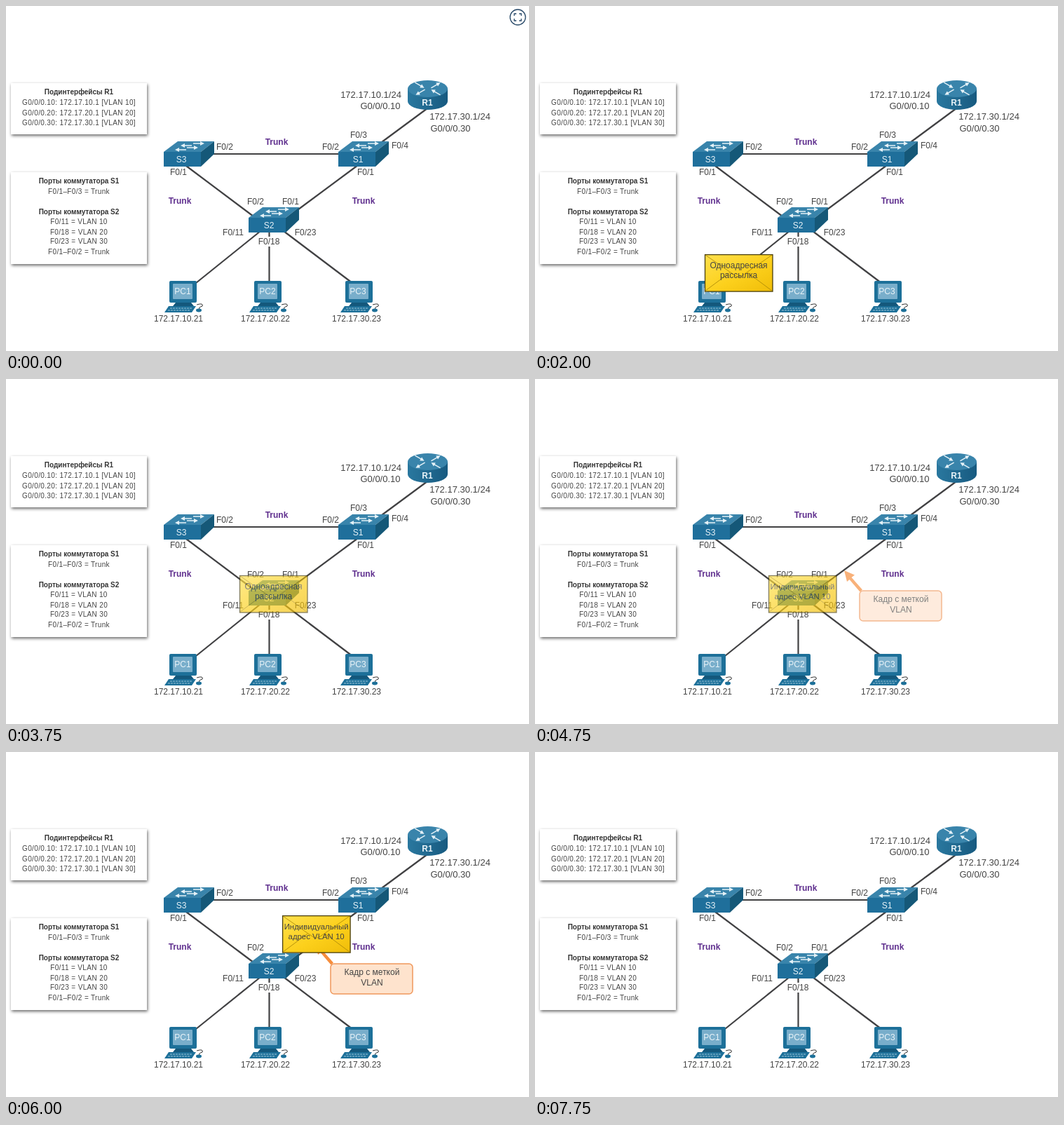
Recreate the animation shown at these times as an HTML page. Size 746 by 492 pixels, loop 8000 ms.

```html
<!DOCTYPE html>
<html lang="ru">
<head>
<meta charset="utf-8">
<style>
html, body { margin: 0; width: 100%; height: 100%; overflow: hidden; background: #fff; }
svg { display: block; font: 12px "Liberation Sans", Arial, sans-serif; fill: #444; }
text { text-anchor: middle; }
.left text { text-anchor: start; }
.links { stroke: #414143; stroke-width: 2.2; }
.trunk { font-weight: bold; fill: #5f2f8e; }
.name { fill: #e8f3f8; }
.panel rect { fill: #fff; filter: drop-shadow(1px 2px 2px #0009); }
.panel text { font-size: 10px; letter-spacing: .35px; }
.panel .title { font-weight: bold; letter-spacing: 0; fill: #333; }
.big { font-size: 13px; }
</style>
</head>
<body>
<svg width="746" height="492" viewBox="0 0 746 492">
  <defs>
    <linearGradient id="gold" x2="1" y2="1">
      <stop stop-color="#ffe04c"/><stop offset=".55" stop-color="#fcd01c"/><stop offset="1" stop-color="#f0bd08"/>
    </linearGradient>
    <linearGradient id="side"><stop stop-color="#2a789f"/><stop offset="1" stop-color="#175a80"/></linearGradient>
    <path id="arrow" d="M-8-.8H2V-3L8 0 2 3V.8H-8z"/>
    <g id="switch">
      <path fill="#3984ab" d="M0 15 20 0H72L53 15z"/>
      <path fill="#1f6f9b" d="M0 15H53V36H0z"/>
      <path fill="#155878" d="M53 15 72 0V18L53 36z"/>
      <g fill="#e4f1f7">
        <use href="#arrow" x="50" y="3"/><use href="#arrow" x="41" y="9"/>
        <use href="#arrow" transform="translate(32 6) scale(-1 1)"/>
        <use href="#arrow" transform="translate(24 12) scale(-1 1)"/>
      </g>
    </g>
    <g id="pc">
      <path fill="#14587c" d="M40 1 46 5V28L40 31z"/>
      <rect x="7" width="39" height="31" rx="2" fill="#1d7099"/>
      <rect x="12" y="4" width="28" height="22" rx="1" fill="#79aecb"/>
      <path fill="#14587c" d="M16 31H38L42 36H12z"/>
      <path fill="#1d7099" d="M6 36H45L39 45H0z"/>
      <path stroke="#9cc6da" stroke-dasharray="3 1" d="M8 39H40M5 42H37"/>
      <path fill="none" stroke="#333" d="M46 34q10-3 8 2-6 2-4 4"/>
      <ellipse cx="49" cy="42" rx="4" ry="2.4" fill="#1d7099"/>
    </g>
  </defs>

  <g id="fullscreen" fill="none" stroke="#294a69" stroke-width="1.3">
    <circle cx="730" cy="16" r="11"/>
    <path d="M725 14v-3h3M732 11h3v3M735 18v3h-3M728 21h-3v-3"/>
  </g>

  <path class="links" d="M296 211H476M257 228 353 300M502 227 413 293M532 197 601 146M363 321 271 395M375.500 322V329M375.500 343V393M396 321 494 395"/>
  <use href="#switch" x="225" y="193"/>
  <use href="#switch" x="474" y="193"/>
  <use href="#switch" x="346" y="287"/>

  <path fill="url(#side)" d="M573 118V136A28.500 12 0 0 0 630 136V118z"/>
  <ellipse cx="601.500" cy="118" rx="28.500" ry="12" fill="#3984ab"/>
  <g id="routerArrows" fill="#e4f1f7"></g>

  <use href="#pc" x="226" y="392"/>
  <use href="#pc" x="347" y="392"/>
  <use href="#pc" x="477" y="392"/>
  <g id="labels"></g>
  <g id="panels" class="panel"></g>

  <g id="callout">
    <path fill="#f68d3c" d="M441 273 456 279.500 451.500 283 467 300.500 463.500 303.500 448.500 286 445 289z"/>
    <rect x="463" y="302" width="117" height="43" rx="5" fill="#fee3cd" stroke="#f0985c" stroke-width="1.5"/>
    <text x="522" y="318">Кадр с меткой</text>
    <text x="522" y="333">VLAN</text>
  </g>
  <g id="packets"></g>
</svg>
<script>
const LOOP = 8000, STEP = 250, FADE = 390;
const byId = id => document.getElementById(id);
const text = (x, y, s, attrs = '') => `<text x="${x}" y="${y}" ${attrs}>${s}</text>`;

byId('routerArrows').innerHTML = [[590, 113, 30], [613, 113, -30], [591, 123, 150], [613, 123, 210]]
  .map(([x, y, a]) => `<use href="#arrow" transform="translate(${x} ${y}) rotate(${a}) scale(.95)"/>`).join('');

const ports = [
  [312, 205, 'F0/2'], [246, 241, 'F0/1'], [463, 205, 'F0/2'], [503, 188, 'F0/3'],
  [562, 203, 'F0/4'], [513, 241, 'F0/1'], [356, 283, 'F0/2'], [406, 283, 'F0/1'],
  [324, 327, 'F0/11'], [375, 340, 'F0/18'], [427, 327, 'F0/23'],
  [246, 450, '172.17.10.21'], [370, 450, '172.17.20.22'], [500, 450, '172.17.30.23']
];
const addresses = [
  [520.5, 131, '172.17.10.1/24'], [534, 147, 'G0/0/0.10'],
  [647.5, 162, '172.17.30.1/24'], [634, 179, 'G0/0/0.30']
];
const names = [[250, 223, 'S3'], [502, 223, 'S1'], [375, 317, 'S2'], [252, 411, 'PC1'], [373, 411, 'PC2'], [502, 411, 'PC3']];
const trunks = [[386, 198], [248, 282], [510, 282]];
byId('labels').innerHTML = [
  ...ports.map(p => text(...p)),
  ...addresses.map(p => text(...p, 'class="big"')),
  ...names.map(p => text(...p, 'class="name"')),
  text(601, 142, 'R1', 'class="name" font-weight="bold"'),
  ...trunks.map(p => text(...p, 'Trunk', 'class="trunk"'))
].join('');

const panel = (y, height, lines) => `<rect x="7" y="${y}" width="194" height="${height}"/>` +
  lines.map(([ty, s, title]) => text(104, ty, s, title ? 'class="title"' : '')).join('');
byId('panels').innerHTML =
  panel(110, 73, [
    [126, 'Подинтерфейсы R1', true],
    [141, 'G0/0/0.10: 172.17.10.1 [VLAN 10]'],
    [156, 'G0/0/0.20: 172.17.20.1 [VLAN 20]'],
    [169.5, 'G0/0/0.30: 172.17.30.1 [VLAN 30]']
  ]) +
  panel(237, 131, [
    [253, 'Порты коммутатора S1', true], [268, 'F0/1–F0/3 = Trunk'],
    [296.5, 'Порты коммутатора S2', true], [311, 'F0/11 = VLAN 10'],
    [326, 'F0/18 = VLAN 20'], [339, 'F0/23 = VLAN 30'], [354, 'F0/1–F0/2 = Trunk']
  ]);

const packets = [
  { lines: ['Одноадресная', 'рассылка'], size: 12, from: [193, 394], to: [333, 280], start: 1125, end: 3625 },
  { lines: ['Индивидуальный', 'адрес VLAN 10'], size: 11.4, from: [333, 280], to: [462, 181], start: 4875, end: 7250 }
];
byId('packets').innerHTML = packets.map(({ lines, size }) => `<g font-size="${size}">
  <rect x=".5" y=".5" width="96.500" height="52.500" fill="url(#gold)" stroke="#4a4012" stroke-width="1.3"/>
  <path d="M1 1 43 30Q48.500 34 54 30L96 1M1 52 36 26M96 52 61 26" fill="none" stroke="#b08d08" stroke-width=".9"/>
  ${text(48.5, 20, lines[0])}${text(48.5, 33.5, lines[1])}</g>`).join('');
packets.forEach((p, i) => p.node = byId('packets').children[i]);

const clamp = v => Math.max(0, Math.min(1, v));
const opacity = (t, { start, end }) => clamp(Math.min((t - start) / FADE + 1, 1 - (t - end) / FADE));

function draw(now) {
  const t = Math.floor(now % LOOP / STEP) * STEP;
  byId('fullscreen').setAttribute('opacity', t < STEP ? 1 : 0);
  byId('callout').setAttribute('opacity', opacity(t, packets[1]));
  for (const p of packets) {
    const k = clamp((t - p.start) / (p.end - p.start));
    const [x, y] = p.from.map((a, i) => a + (p.to[i] - a) * k);
    p.node.setAttribute('transform', `translate(${x} ${y})`);
    p.node.setAttribute('opacity', opacity(t, p));
  }
}

const origin = performance.now();
function tick() {
  draw(performance.now() - origin);
  requestAnimationFrame(tick);
}
tick();
</script>
</body>
</html>
```
